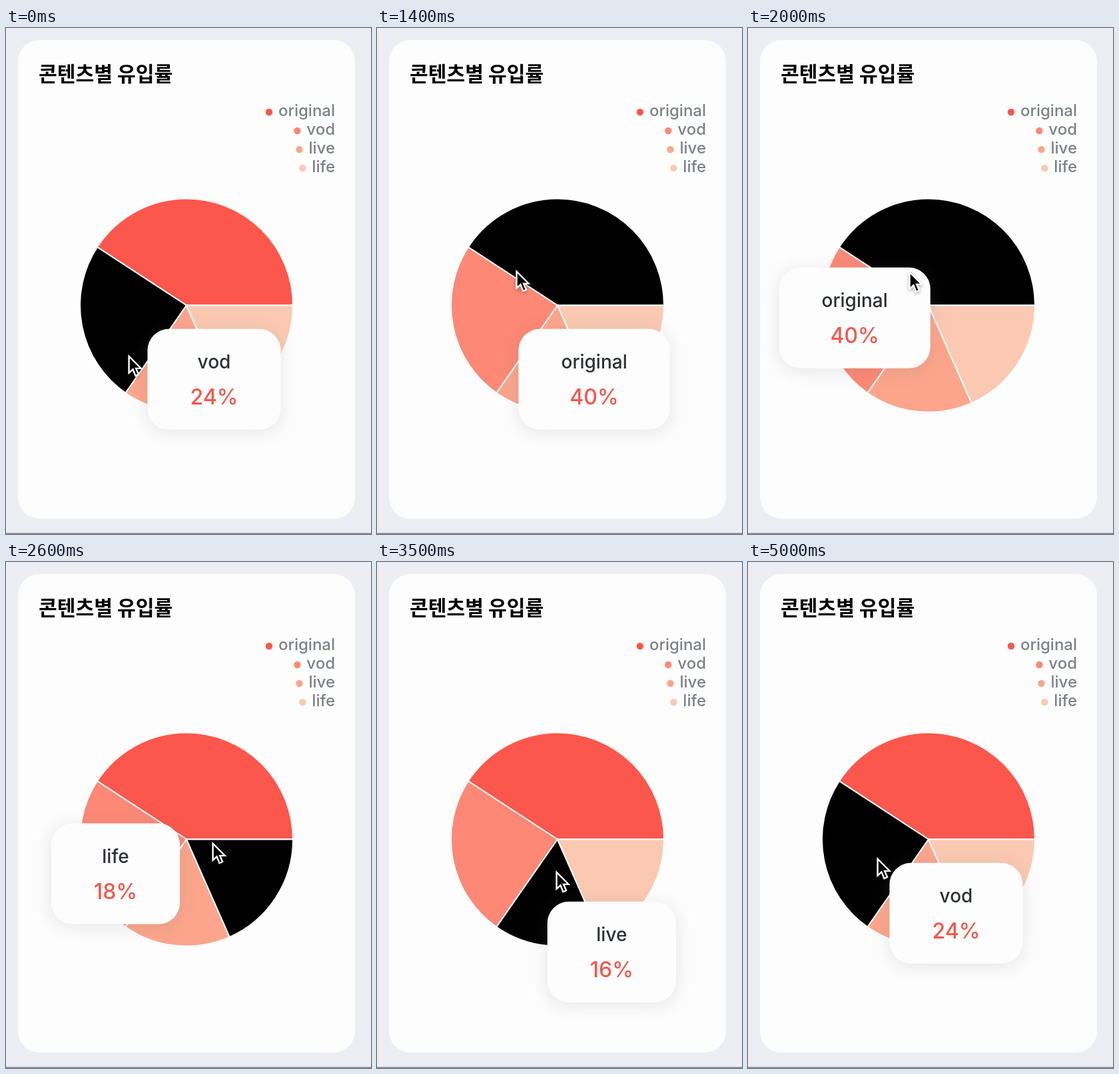
An HTML page with a canvas that plays this animation: 548x758 px, repeating every 5200 ms.

```html
<!DOCTYPE html>
<html lang="ko">
<head>
<meta charset="utf-8">
<title>콘텐츠별 유입률</title>
<style>
  html, body { margin: 0; width: 100%; height: 100%; overflow: hidden; background: #edeef3; }
  canvas { display: block; }
</style>
</head>
<body>
<canvas id="stage" width="548" height="758"></canvas>
<script>
const ctx = document.getElementById('stage').getContext('2d');
const LOOP = 5200, STEP = 100, SLIDE = 400;
const CX = 271, CY = 415.5, R = 160, GAP = 20, PAD = 64, LIMIT = 520;
const fonts = {
  title: '700 30.2px "Noto Sans CJK KR", "Noto Sans CJK", sans-serif',
  legend: '500 24px Inter, sans-serif',
  name: '500 28px Inter, sans-serif',
  share: '500 32px Inter, sans-serif'
};

const slices = [
  { name: 'original', share: 40, color: '#fc574c' },
  { name: 'vod', share: 24, color: '#fc8875' },
  { name: 'live', share: 16, color: '#fca58c' },
  { name: 'life', share: 18, color: '#fbc9b2' }
];

// Time and slice index of each hover; the first carries over the loop.
const hovers = [[-SLIDE, 1], [1400, 0], [2524, 3], [3290, 2], [3957, 1]];

// Pointer key points: time, x, y
const path = [
  [0, 184, 489], [900, 184, 487], [1400, 209, 362], [2000, 242, 363],
  [2600, 310, 419], [3500, 269, 462], [4100, 206, 442], [5000, 194, 442], [LOOP, 194, 442]
];

const mix = (a, b, k) => a + (b - a) * k;

function textWidth(str, font) {
  ctx.font = font;
  return ctx.measureText(str).width;
}

// Angles, tooltip widths and tooltip anchors follow from the shares.
function layout() {
  const total = slices.reduce((sum, s) => sum + s.share, 0);
  let angle = 0;
  for (const s of slices) {
    s.from = angle;
    s.to = angle += s.share / total * 2 * Math.PI;
    s.label = s.share + '%';
    s.box = 2 * PAD + Math.max(textWidth(s.name, fonts.name), textWidth(s.label, fonts.share));
    const mid = (s.from + s.to) / 2;
    const x = CX + R / 2 * Math.cos(mid);
    s.x = x + GAP + s.box > LIMIT ? x - GAP - s.box : x + GAP;
    s.y = CY - R / 2 * Math.sin(mid) + GAP;
  }
}

// cubic-bezier(.25, .1, .25, 1)
function ease(x) {
  if (x <= 0) return 0;
  if (x >= 1) return 1;
  const curve = (u, a, b) => 3 * a * u * (1 - u) ** 2 + 3 * b * u * u * (1 - u) + u ** 3;
  let lo = 0, hi = 1;
  for (let i = 0; i < 24; i++) {
    const mid = (lo + hi) / 2;
    if (curve(mid, 0.25, 0.25) < x) lo = mid; else hi = mid;
  }
  return curve(lo, 0.1, 1);
}

function pointerAt(t) {
  const i = Math.max(1, path.findIndex(p => p[0] >= t));
  const [t0, x0, y0] = path[i - 1], [t1, x1, y1] = path[i];
  const k = (t - t0) / (t1 - t0);
  return [mix(x0, x1, k), mix(y0, y1, k)];
}

function tooltipAt(t) {
  const i = hovers.findLastIndex(h => h[0] <= t);
  const [at, index] = hovers[i];
  const slice = slices[index];
  const last = slices[hovers[Math.max(0, i - 1)][1]];
  const k = ease((t - at) / SLIDE);
  return { slice, x: mix(last.x, slice.x, k), y: mix(last.y, slice.y, k) };
}

function text(str, x, y, font, color, align) {
  ctx.font = font;
  ctx.fillStyle = color;
  ctx.textAlign = align;
  ctx.fillText(str, x, y);
}

function roundBox(x, y, w, h) {
  ctx.fillStyle = '#fdfdfd';
  ctx.beginPath();
  ctx.roundRect(x, y, w, h, 32);
  ctx.fill();
}

function shadow(color, blur, dy) {
  ctx.shadowColor = color;
  ctx.shadowBlur = blur;
  ctx.shadowOffsetY = dy;
}

function drawCard() {
  ctx.fillStyle = '#edeef3';
  ctx.fillRect(0, 0, 548, 758);
  ctx.fillStyle = '#828286';
  ctx.fillRect(0, 756.5, 548, 1.5);
  roundBox(18, 18, 506, 717);
  text('콘텐츠별 유입률', 49, 80, fonts.title, '#000', 'left');
  slices.forEach((s, i) => {
    const y = 126 + i * 28;
    text(s.name, 494, y + 6, fonts.legend, '#7c8187', 'right');
    ctx.fillStyle = s.color;
    ctx.beginPath();
    ctx.arc(480 - textWidth(s.name, fonts.legend), y, 5.2, 0, 2 * Math.PI);
    ctx.fill();
  });
}

function drawPie(active) {
  ctx.strokeStyle = '#fff';
  ctx.lineWidth = 2;
  for (const s of slices) {
    ctx.fillStyle = s === active ? '#000' : s.color;
    ctx.beginPath();
    ctx.moveTo(CX, CY);
    ctx.arc(CX, CY, R, -s.from, -s.to, true);
    ctx.closePath();
    ctx.fill();
    ctx.stroke();
  }
}

function drawTooltip({ slice, x, y }) {
  const mid = x + slice.box / 2;
  ctx.save();
  shadow('rgba(120,120,120,.18)', 26, 4);
  roundBox(x, y, slice.box, 151);
  ctx.restore();
  text(slice.name, mid, y + 59, fonts.name, '#2d3035', 'center');
  text(slice.label, mid, y + 113, fonts.share, '#f4574b', 'center');
}

function drawPointer([x, y]) {
  const arrow = new Path2D('M1.2 3V27.5L7 22.2L11 32L15.5 30L11.5 20.8H19Z');
  ctx.save();
  ctx.translate(x - 0.5, y);
  ctx.lineWidth = 2.2;
  ctx.strokeStyle = '#fff';
  ctx.fillStyle = '#000';
  shadow('rgba(0,0,0,.4)', 5, 2);
  ctx.stroke(arrow);
  shadow('transparent', 0, 0);
  ctx.fill(arrow);
  ctx.stroke(arrow);
  ctx.restore();
}

function frame() {
  const t = Math.floor(performance.now() % LOOP / STEP) * STEP;
  const tip = tooltipAt(t);
  drawCard();
  drawPie(tip.slice);
  drawTooltip(tip);
  drawPointer(pointerAt(t));
  requestAnimationFrame(frame);
}

layout();
frame();
</script>
</body>
</html>
```
